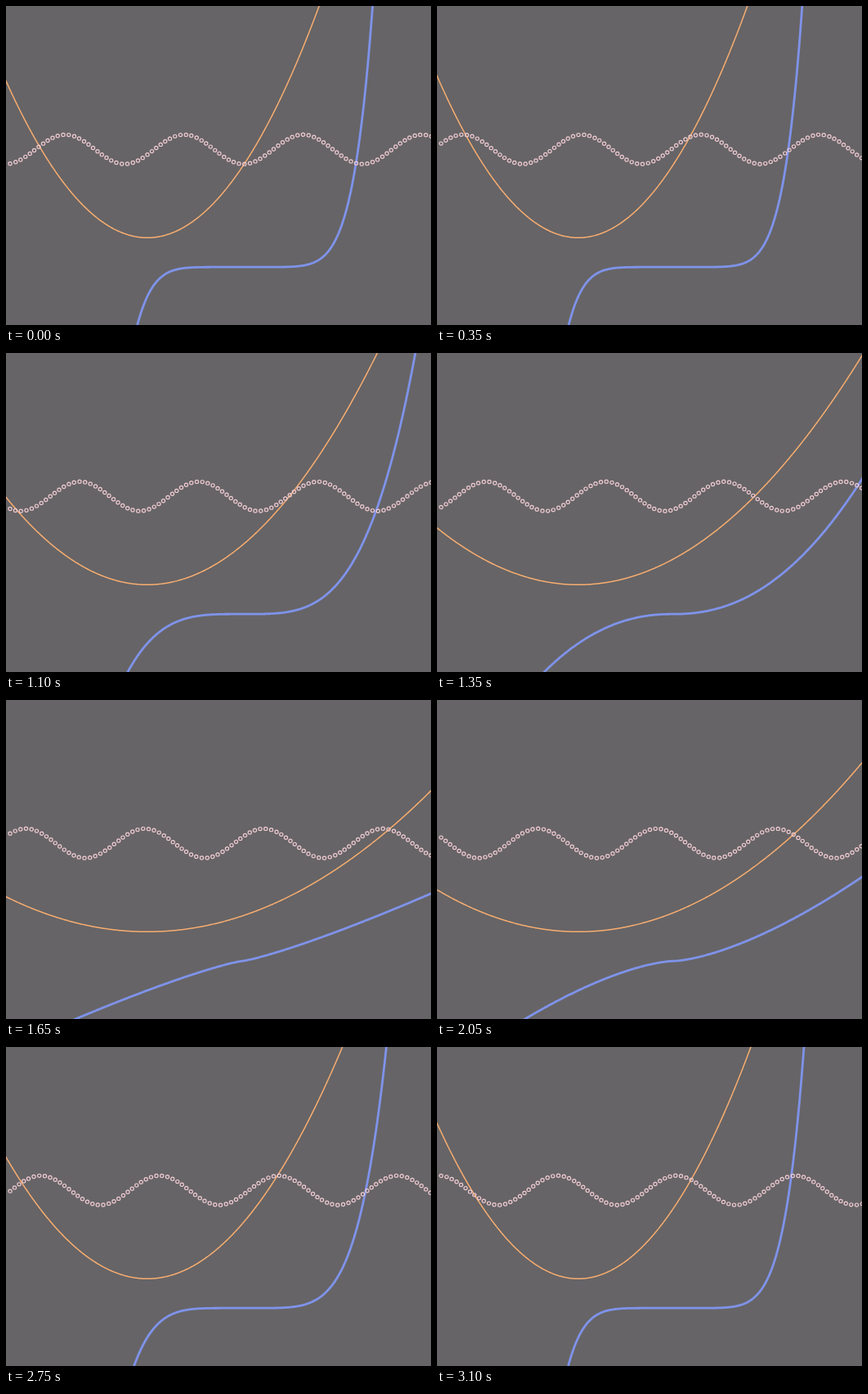
These frames come from a looping animation (520x390 px, 3.15 s). An HTML page with a canvas:

```html
<!DOCTYPE html>
<html lang="en">
<head>
<meta charset="utf-8">
<title>Moving function curves</title>
<style>
  html, body { margin: 0; width: 100%; height: 100%; overflow: hidden; background: #666466; }
  canvas { display: block; }
</style>
</head>
<body>
<canvas id="stage" width="520" height="390"></canvas>
<script>
const W = 520, H = 390;
const LOOP = 3150, STEP = 50;
const UNIT_X = 115.8, UNIT_Y = 35.9;
const ORIGIN = { x: 288.7, y: 319.2 };
const SPACING = 6.8;

const canvas = document.getElementById('stage');
const ctx = canvas.getContext('2d');
const ratio = window.devicePixelRatio || 1;
canvas.width = W * ratio;
canvas.height = H * ratio;
canvas.style.width = W + 'px';
canvas.style.height = H + 'px';
ctx.scale(ratio, ratio);

const toX = px => (px - ORIGIN.x) / UNIT_X;
const toPy = y => ORIGIN.y - y * UNIT_Y;

// Steady phase, with a slight hurry in the middle of the loop
function phaseAt(step) {
  const hurry = Math.min(1, Math.max(0, (step - 22) / 11));
  return step * 0.1 + hurry * 0.043;
}

function plot(fn, color, width) {
  ctx.beginPath();
  for (let px = -4; px <= W + 4; px++) ctx.lineTo(px, toPy(fn(toX(px))));
  ctx.strokeStyle = color;
  ctx.lineWidth = width;
  ctx.lineJoin = 'round';
  ctx.stroke();
}

function ring(x, y) {
  ctx.beginPath();
  ctx.arc(x, y, 2.1, 0, Math.PI * 2);
  ctx.stroke();
}

// Rings at equal distances along the curve
function beads(fn, color) {
  ctx.strokeStyle = color;
  ctx.lineWidth = 1.2;
  let lastX = 5, lastY = toPy(fn(toX(5))), walked = 0;
  ring(lastX, lastY);
  for (let px = 5.25; px < W + 3; px += 0.25) {
    const py = toPy(fn(toX(px)));
    walked += Math.hypot(px - lastX, py - lastY);
    if (walked >= SPACING) {
      ring(px, py);
      walked -= SPACING;
    }
    lastX = px;
    lastY = py;
  }
}

function draw(ms) {
  const t = phaseAt(Math.floor((ms % LOOP) / STEP));
  const swing = Math.cos(t - 0.465);
  const power = 4.1 + 3 * swing;
  const waveStart = toX(145.2);

  ctx.fillStyle = '#666466';
  ctx.fillRect(0, 0, W, H);
  plot(x => 1 + (1.5 + swing) * (x + 1) ** 2, '#f8ad70', 1.5);
  plot(x => Math.sign(x) * Math.abs(x) ** power, '#7f93ea', 2.8);
  beads(x => 4.01 - 0.5 * Math.cos(5 * (x - waveStart) + 2.5 * t), '#f0cbd3');
}

const start = performance.now();
function tick() {
  draw(performance.now() - start);
  requestAnimationFrame(tick);
}
tick();
</script>
</body>
</html>
```
